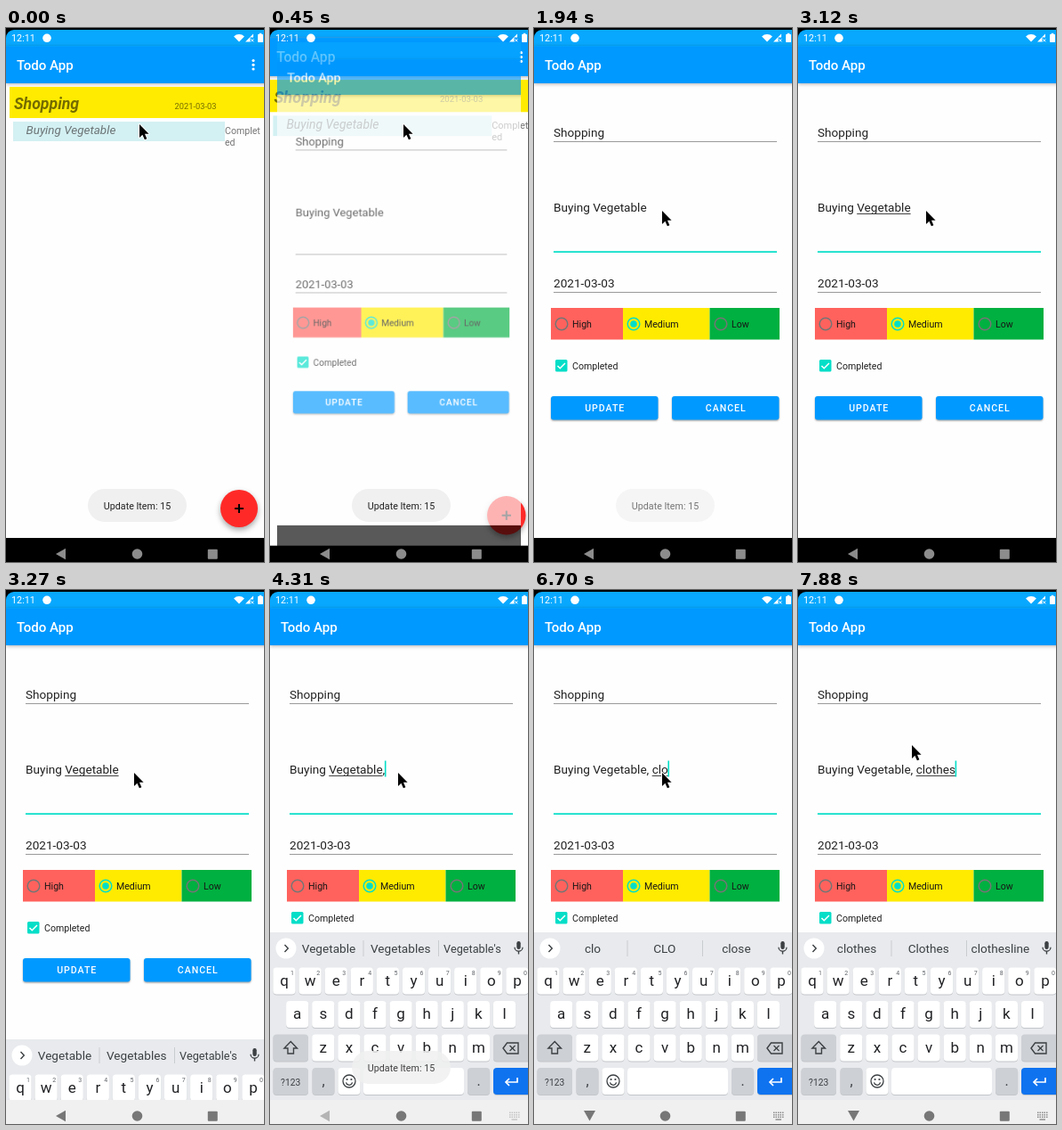
These frames come from a looping animation (290x599 px, 8000 ms). An HTML page with a canvas:

```html
<!DOCTYPE html>
<html lang="en">
<head>
<meta charset="utf-8">
<title>Todo App</title>
<style>
html, body { margin: 0; width: 290px; height: 599px; overflow: hidden; background: #000; }
canvas { display: block; width: 290px; height: 599px; }
</style>
</head>
<body>
<canvas id="stage"></canvas>
<script>
const W = 290, H = 599, SCREEN_W = 295, LOOP = 8000, TICK = 148.7;
const BLUE = '#0099ff', STATUS = '#08a8ff', TEAL = '#03dec8', PAGE = '#fefefe', YELLOW = '#ffeb00';
const dpr = window.devicePixelRatio || 1;

function setup(canvas) {
  canvas.width = W * dpr;
  canvas.height = H * dpr;
  const c = canvas.getContext('2d');
  c.scale(dpr, dpr);
  return c;
}
const main = setup(document.getElementById('stage'));
const layer = document.createElement('canvas');
const layerCtx = setup(layer);
let g = main;

// Last entry whose step is not after n
const at = (list, n) => list.filter(e => e[0] <= n).pop()[1];

const TYPED = [[0, ''], [24, ','], [31, ', '], [33, ', c'], [35, ', cl'], [45, ', clo'],
  [47, ', clot'], [49, ', cloth'], [51, ', clothe'], [52, ', clothes']];
const HINTS = [[0, ['Vegetable', 'Vegetables', "Vegetable's"]], [31, ['and', 'I', 'the']],
  [33, ['c', 'C', 'can']], [35, ['cl', 'CL', 'class']], [45, ['clo', 'CLO', 'close']],
  [47, ['clot', 'Clot', 'clothes']], [49, ['cloth', 'Cloth', 'clothes']],
  [51, ['clothe', 'Clothe', 'clothes']], [52, ['clothes', 'Clothes', 'clothesline']]];
const POINTER = [[0, [150, 108]], [4, [154, 150]], [5, [157, 190]], [6, [154, 196]], [7, [149, 202]],
  [8, [144, 205]], [51, [138, 193]], [52, [132, 181]], [53, [128, 174]]];
const TOAST = [[0, 1], [13, .6], [14, .25], [15, 0], [29, .85], [40, .6], [41, .35], [42, .12], [43, 0]];
// Caret: 0 hidden, 1 at the start, 2 at the end
const CARET = [[0, 0], [9, 1], [12, 0], [15, 1], [17, 2], [19, 0], [24, 2], [40, 0], [43, 2]];
const SLIDE = [[0, 250], [22, 120], [23, 25], [24, 0]];

function rect(x, y, w, h, color) {
  g.fillStyle = color;
  g.fillRect(x, y, w, h);
}

function box(x, y, w, h, r, color) {
  g.fillStyle = color;
  g.beginPath();
  g.roundRect(x, y, w, h, r);
  g.fill();
}

function disc(x, y, r, color) {
  g.fillStyle = color;
  g.beginPath();
  g.arc(x, y, r, 0, Math.PI * 2);
  g.fill();
}

function ring(x, y, r, color, width) {
  g.strokeStyle = color;
  g.lineWidth = width;
  g.beginPath();
  g.arc(x, y, r, 0, Math.PI * 2);
  g.stroke();
}

function path(points, closed) {
  g.beginPath();
  points.forEach(([x, y]) => g.lineTo(x, y));
  if (closed) g.closePath();
}

function poly(points, color) {
  path(points, true);
  g.fillStyle = color;
  g.fill();
}

function line(points, color, width, closed) {
  path(points, closed);
  g.strokeStyle = color;
  g.lineWidth = width;
  g.stroke();
}

function text(str, x, y, size, color, style = '', align = 'left', spacing = 0) {
  g.font = `${style} ${size}px Roboto, sans-serif`;
  g.letterSpacing = spacing + 'px';
  g.textAlign = align;
  g.fillStyle = color;
  g.fillText(str, x, y);
  g.letterSpacing = '0px';
}

function shadow(blur, dy, alpha) {
  g.shadowColor = `rgba(0,0,0,${alpha})`;
  g.shadowBlur = blur * dpr;
  g.shadowOffsetY = dy * dpr;
}
const noShadow = () => { g.shadowColor = 'transparent'; };

function chrome() {
  rect(0, 0, SCREEN_W, 20, STATUS);
  rect(0, 20, SCREEN_W, 552, PAGE);
  shadow(4, 1, .3);
  rect(0, 20, SCREEN_W, 42, BLUE);
  noShadow();
  rect(0, 20, SCREEN_W, 1, '#03a0ff');
  text('Todo App', 12, 47, 15.1, '#fff', '500');
  rect(0, 572, SCREEN_W, 40, '#000');
}

function listScreen() {
  chrome();
  for (const y of [36.5, 41.3, 46]) disc(278, y, 1.6, '#fff');
  rect(4, 66, 291, 35, YELLOW);
  text('Shopping', 9, 91, 17.7, '#756c00', 'italic bold');
  text('2021-03-03', 189.5, 90.5, 9.3, '#756c00');
  rect(8, 105, 238, 22, '#d3f0f2');
  text('Buying Vegetable', 22.5, 119, 13.5, '#6c7476', 'italic');
  text('Complet', 246, 119, 10.6, '#757575');
  text('ed', 246, 131.7, 10.6, '#757575');
  shadow(6, 3, .35);
  disc(262, 539, 21, '#ff2a28');
  noShadow();
  rect(257, 538, 10, 2, '#000');
  rect(261, 534, 2, 10, '#000');
}

function radio(x, label, on) {
  const color = on ? TEAL : '#757575';
  ring(x, 332, 6.8, color, 1.5);
  if (on) disc(x, 332, 3.8, color);
  text(label, x + 12, 336, 10.6, '#161616');
}

function button(x, label) {
  shadow(2, 1.2, .35);
  box(x, 413, 120.5, 26.5, 3, BLUE);
  noShadow();
  text(label, x + 60.7, 430.3, 10.6, '#fff', '500', 'center', .95);
}

function formScreen(n) {
  const focused = n >= 9, ink = '#212121';
  chrome();
  text('Shopping', 22, 122, 13.6, ink);
  rect(22, 127, 251, 1, '#9a9a9a');

  const base = 'Buying Vegetable', full = base + at(TYPED, n);
  text(full, 22, 206, 13.6, ink);
  const width = s => g.measureText(s).width;
  if (n >= 17) {
    const end = n < 31 ? base : full;
    const from = 22 + width(end.slice(0, end.lastIndexOf(' ') + 1));
    rect(from, 208, 22 + width(end) - from, 1, '#444');
  }
  const caret = at(CARET, n);
  if (caret) rect(caret === 1 ? 21 : 21.6 + width(full), 191.5, 1.6, 18, TEAL);
  if (focused) rect(22, 250.3, 251, 1.7, TEAL);
  else rect(22, 250.5, 251, 1, '#9a9a9a');

  text('2021-03-03', 22, 291, 13.6, ink);
  rect(22, 296, 251, 1, '#9a9a9a');

  rect(19, 314, 81, 35.5, '#ff625d');
  rect(100, 314, 97.5, 35.5, YELLOW);
  rect(197.5, 314, 78.5, 35.5, '#00b040');
  radio(31, 'High');
  radio(112, 'Medium', true);
  radio(210, 'Low');

  const up = n >= 24 ? 11 : 0;
  box(24, 372 - up, 13.5, 13.5, 1.5, TEAL);
  line([[26.5, 379 - up], [29.3, 381.8 - up], [35, 376 - up]], '#fff', 1.5);
  text('Completed', 43, 383 - up, 10.6, ink);

  if (!up) {
    button(19, 'UPDATE');
    button(155, 'CANCEL');
  }
}

function key(x, y, w, color) {
  box(x, y + 1, w, 30, 4, '#c3c6ca');
  box(x, y, w, 30, 4, color);
}

function keyRow(letters, cx, y) {
  [...letters].forEach((ch, i) => {
    const x = cx + i * 29.1;
    key(x - 12.6, y, 25.2, '#fff');
    text(ch, x, y + 20, 17, '#202124', '', 'center');
    if (letters.length === 10) text((i + 1) % 10, x + 9, y + 8, 7, '#5f6368', '', 'center');
  });
}

function keyboard(n) {
  const gray = '#cdd0d5', ink = '#3c4043';
  g.save();
  g.beginPath();
  g.rect(0, 0, W, 573);
  g.clip();
  g.translate(0, at(SLIDE, n));
  rect(0, 384, SCREEN_W, 250, '#e8eaed');

  disc(18, 402, 11.5, '#fff');
  line([[16.5, 398], [20.3, 402], [16.5, 406]], ink, 1.4);
  at(HINTS, n).forEach((word, i) => {
    text(word, 66 + i * 80.7, 407, word.length > 10 && i === 2 && n < 31 ? 12.7 : 13.6, ink, '', 'center');
  });
  rect(104.5, 393, 1, 18, '#c9ccd0');
  rect(189, 393, 1, 18, '#c9ccd0');
  box(277.3, 394, 4.4, 9, 2.2, ink);
  g.beginPath();
  g.arc(279.5, 400.7, 4.5, 0, Math.PI);
  g.strokeStyle = ink;
  g.lineWidth = 1.3;
  g.stroke();
  rect(278.8, 405, 1.4, 3.5, ink);

  keyRow('qwertyuiop', 16, 423.5);
  keyRow('asdfghjkl', 30.7, 461);
  keyRow('zxcvbnm', 59.8, 498.5);

  key(3.5, 498.5, 39.5, gray);
  line([[23.3, 506.5], [30.5, 514], [26.5, 514], [26.5, 520], [20, 520], [20, 514], [16, 514]], ink, 1.4, true);
  key(251, 498.5, 44, gray);
  line([[262, 514], [266.5, 508], [279, 508], [279, 520], [266.5, 520]], ink, 1.4, true);
  line([[269.5, 511], [275.5, 517]], ink, 1.3);
  line([[275.5, 511], [269.5, 517]], ink, 1.3);

  key(3.5, 536, 39.5, gray);
  text('?123', 23.2, 555.5, 10.3, ink, '', 'center');
  key(47.5, 536, 25, gray);
  text(',', 60, 556, 16, ink, '', 'center');
  key(76.5, 536, 25, '#fff');
  ring(89, 551, 7, ink, 1.3);
  disc(86.6, 549, 1.1, ink);
  disc(91.4, 549, 1.1, ink);
  g.beginPath();
  g.arc(89, 551.7, 3.6, .2, Math.PI - .2);
  g.stroke();
  key(105, 536, 113, '#fff');
  key(222, 536, 25.2, gray);
  text('.', 234.6, 556, 16, ink, '', 'center');
  key(251, 536, 44, '#0f73f0');
  line([[278, 547], [278, 552], [265, 552]], '#fff', 1.7);
  line([[269, 548], [265, 552], [269, 556]], '#fff', 1.7);
  g.restore();
}

function navBar(n) {
  const light = n >= 22, gray = light ? '#777' : '#8c8c8c';
  if (light) rect(0, 572, SCREEN_W, 30, '#f0f0f0');
  if (n >= 31) poly([[56, 584], [69, 584], [62.5, 595.5]], gray);
  else poly([[56, 590], [67, 583.8], [67, 596.2]], n >= 29 ? '#b4b4b4' : gray);
  disc(147.5, 590, 5.8, gray);
  box(226.8, 584.7, 11, 11, 1, gray);
  if (n < 29) return;
  const icon = n < 31 ? '#c4c4c4' : '#8a8a8a';
  for (let r = 0; r < 3; r++)
    for (let c = 0; c < 5; c++) rect(269 + c * 2.5, 585.5 + r * 2.5, 1.5, 1.5, icon);
  rect(271.5, 593.3, 6.5, 1.4, icon);
}

function statusIcons() {
  text('12:11', 6, 15.3, 10.8, '#fff');
  disc(46, 11.3, 4.8, '#fff');
  g.beginPath();
  g.moveTo(262, 15.5);
  g.arc(262, 15.5, 8.4, -Math.PI * .75, -Math.PI * .25);
  g.closePath();
  g.fillStyle = '#fff';
  g.fill();
  poly([[269, 15.5], [278, 6.5], [278, 10.5], [274.5, 10.5], [274.5, 15.5]], '#fff');
  line([[275.3, 12.3], [278.3, 15.3]], '#fff', 1);
  line([[278.3, 12.3], [275.3, 15.3]], '#fff', 1);
  box(283, 7, 6, 9, .8, '#fff');
  rect(284.7, 5.8, 2.6, 1.5, '#fff');
}

function toast(alpha) {
  if (!alpha) return;
  g.globalAlpha = alpha;
  box(92, 517, 111, 37, 18.5, '#f0f0f0');
  text('Update Item: 15', 147.5, 540, 10.7, '#202020', '', 'center');
  g.globalAlpha = 1;
}

function pointer([x, y]) {
  const shape = [[0, 0], [0, 15], [3.4, 11.8], [5.9, 17.3], [8.4, 16.2], [6, 10.8], [10.6, 10.8]];
  const points = shape.map(([px, py]) => [x + px, y + py]);
  g.lineJoin = 'round';
  line(points, '#fff', 1.8, true);
  poly(points, '#000');
  g.lineJoin = 'miter';
}

function zoomed(scale, draw) {
  g.save();
  g.translate(SCREEN_W / 2, 305);
  g.scale(scale, scale);
  g.translate(-SCREEN_W / 2, -305);
  draw();
  g.restore();
}

function opening(n) {
  const first = n === 3;
  zoomed(first ? 1.033 : 1.045, listScreen);
  g = layerCtx;
  formScreen(n);
  g = main;
  g.globalAlpha = first ? .65 : 1;
  zoomed(first ? .947 : .992, () => g.drawImage(layer, 0, 0, W, H));
  g.globalAlpha = 1;
}

function render(t) {
  const n = Math.floor(t / TICK + .04);
  g = main;
  rect(0, 0, W, H, '#000');
  g.save();
  g.beginPath();
  g.roundRect(0, 2, SCREEN_W + 20, 640, [9, 0, 0, 0]);
  g.clip();
  if (n < 3) listScreen();
  else if (n < 5) opening(n);
  else formScreen(n);
  if (n >= 22) keyboard(n);
  navBar(n);
  statusIcons();
  toast(at(TOAST, n));
  pointer(at(POINTER, n));
  g.restore();
}

const start = performance.now();
function frame() {
  render((performance.now() - start) % LOOP);
  requestAnimationFrame(frame);
}
frame();
</script>
</body>
</html>
```
